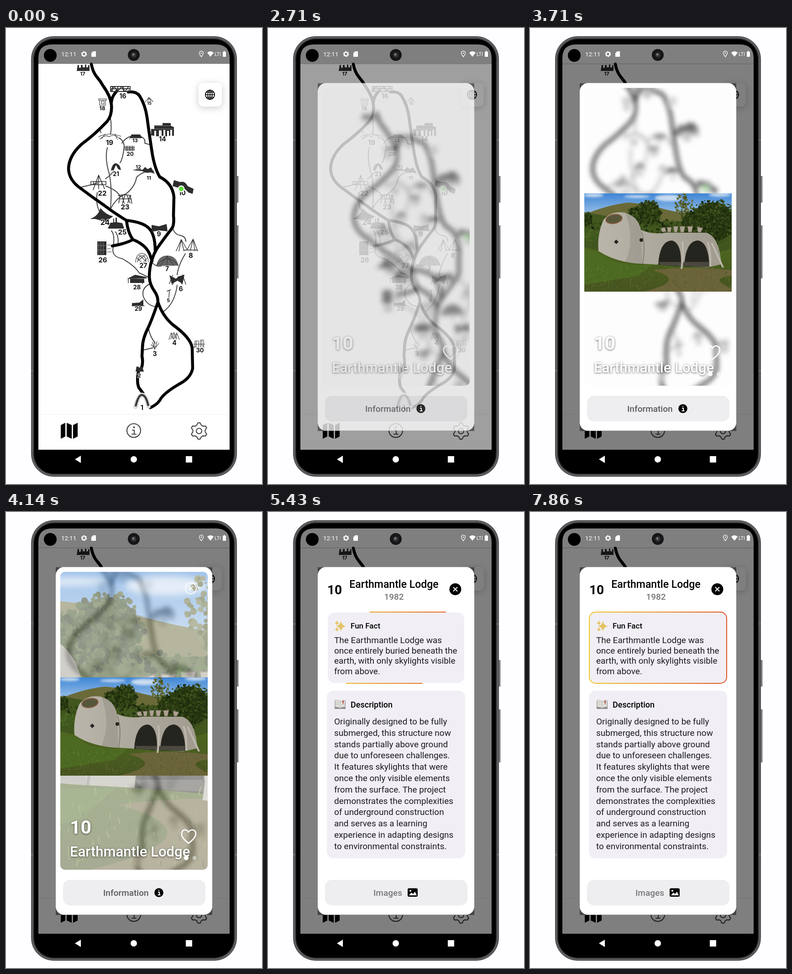
Recreate the animation shown at these times as an HTML page. Size 561 px wide and 998 px high, loop 8000 ms.

```html
<!DOCTYPE html>
<html lang="en">
<head>
<meta charset="utf-8">
<title>Map app</title>
<style>
html, body { margin: 0; width: 100%; height: 100%; overflow: hidden; background: #fefdff; }
svg { display: block; width: 100vw; height: 100vh; font-family: Roboto, sans-serif; }
.medium { font-weight: 500; }
.bold { font-weight: 700; }
.line { fill: none; stroke: #000; stroke-linecap: round; stroke-linejoin: round; }
.soft { filter: drop-shadow(0 2px 4px #0005); }
.glow { filter: drop-shadow(0 1px 2px #0009); }
#labels { font-family: Inter, sans-serif; font-weight: 700; text-anchor: middle; fill: #111; stroke: #fff; stroke-width: 2px; paint-order: stroke; }
</style>
</head>
<body>
<svg viewBox="0 0 561 998">
  <defs>
    <filter id="blur" x="-20%" y="-20%" width="140%" height="140%"><feGaussianBlur stdDeviation="6"/></filter>
    <filter id="haze" x="-20%" y="-50%" width="140%" height="200%"><feGaussianBlur stdDeviation="2.5"/></filter>
    <clipPath id="panel"><rect x="119" y="131" width="323" height="652" rx="10"/></clipPath>
    <clipPath id="thumb"><rect x="143" y="731" width="83" height="83" rx="9"/></clipPath>
    <linearGradient id="sky" x2="0" y2="1"><stop stop-color="#3f86d6"/><stop offset=".6" stop-color="#a9c9ea"/></linearGradient>
    <linearGradient id="meadow" x2="0" y2="1"><stop stop-color="#4c661f"/><stop offset="1" stop-color="#475320"/></linearGradient>
    <linearGradient id="wall" x2="1" y2="0"><stop stop-color="#b9b5aa"/><stop offset="1" stop-color="#a09b8e"/></linearGradient>
    <linearGradient id="fire"><stop stop-color="#efc52c"/><stop offset=".55" stop-color="#ea8a2b"/><stop offset="1" stop-color="#df5128"/></linearGradient>

    <symbol id="photo" viewBox="0 0 323 215" preserveAspectRatio="xMidYMid slice">
      <rect width="323" height="90" fill="url(#sky)"/>
      <g fill="#e8eff6" opacity=".8" filter="url(#haze)"><ellipse cx="20" cy="4" rx="22" ry="4"/><ellipse cx="115" cy="7" rx="28" ry="3"/><ellipse cx="185" cy="10" rx="30" ry="7"/><ellipse cx="297" cy="3" rx="24" ry="4"/></g>
      <path d="M0 46Q55 24 98 20L145 25Q180 38 225 44V120H0z" fill="#6a6a38"/>
      <path d="M0 41Q60 52 130 62L323 60V160H0z" fill="#41561f"/>
      <g id="leaves"/>
      <path d="M0 118Q90 140 180 155L323 122V215H0z" fill="url(#meadow)"/>
      <path d="M150 168Q230 158 323 168V180Q270 186 323 208V215H130Q230 190 150 168z" fill="#6b6339"/>
      <path d="M31 126Q28 88 42 58Q58 38 88 42Q118 50 124 80Q150 91 178 86H268Q290 94 297 130L301 155L270 162L128 154Q70 152 31 126z" fill="url(#wall)"/>
      <path d="M90 43Q118 52 124 80L127 154Q105 152 90 150Q112 100 90 43z" fill="#8f8b7f" opacity=".45"/>
      <path d="M125 84Q135 110 128 154" fill="none" stroke="#858073" stroke-width="2"/>
      <path d="M162 156Q165 104 192 103Q214 108 212 160zM219 160Q222 103 250 103Q273 108 274 161z" fill="#25251f"/>
      <path d="M162 150H274V161L168 157z" fill="#4b483f"/>
      <path d="M213 165Q218 130 215 105M276 160Q278 130 270 106M279 108L304 162" fill="none" stroke="#bdb8ad" stroke-width="4"/>
      <ellipse cx="65" cy="56" rx="18" ry="10" fill="#55563a" stroke="#8d6047" stroke-width="2" transform="rotate(-10 65 56)"/>
      <path d="M70 101l5 5-5 5-5-5z" fill="#222"/><circle cx="125" cy="102" r="4" fill="#282723"/>
      <path d="M167 77l9-3 4 9-9 2zM181 74h10l-2 11h-6zM195 72h11l-3 13h-6zM209 72h12l-3 13h-7zM226 72h12l-3 13h-7zM247 73l13 3-5 9h-6z" fill="#aba18f" stroke="#665c50"/>
      <path d="M0 123Q35 128 58 147Q95 160 150 155L120 180 0 200z" fill="#4d6a22"/>
      <g id="grass" fill="none" stroke-width=".8"/>
    </symbol>

    <g id="map">
      <g class="line" stroke-width="2" style="stroke:#444">
        <path d="M206 224l2 5M229 197Q232 218 229 232M222 262Q216 285 226 318Q233 350 229 393M249 241Q262 251 258 266Q256 285 250 295M254 252Q262 240 274 237M294 237Q307 242 304 252L314 255"/>
        <path d="M166 348Q184 344 198 340M218 330Q230 322 236 313M219 346Q243 355 250 368M230 394Q243 370 263 363Q283 347 286 327Q300 312 323 313M200 360Q196 382 204 400"/>
        <path d="M231 444Q239 452 235 480Q230 500 255 505Q282 520 292 536L311 545M240 446Q248 458 245 473M366 440Q370 452 382 454Q394 456 394 467M393 494Q378 518 375 540M375 563Q370 604 343 622M320 513Q328 523 340 521M315 560Q296 570 301 588Q308 606 327 610M313 660Q316 676 327 690M300 705L322 700"/>
      </g>
      <g class="line" stroke-width="6.5">
        <path d="M187 79Q190 96 199 107Q207 116 213 127Q229 149 231 168Q233 190 222 204Q196 232 166 254Q138 279 137 308Q138 334 165 352Q190 371 215 388Q240 407 264 421Q300 425 313 438Q327 452 327 488M264 421Q267 448 278 463Q306 474 315 495L320 510M278 463Q262 472 233 477"/>
        <path d="M231 162Q232 149 243 138M268 140Q286 138 293 149Q305 168 309 195Q315 240 321 278Q327 310 337 326Q365 340 368 370L367 410Q369 430 364 438Q343 465 330 484Q314 512 314 545Q315 562 326 577Q333 587 333 600Q343 630 365 649Q405 678 408 700L409 745Q405 766 380 779Q344 800 337 815Q330 825 316 831M333 600Q321 635 312 655Q299 680 299 700L298 718Q301 732 297 744M290 753Q286 775 291 787L300 799" />
      </g>
      <g fill="#2d2d2d">
        <path d="M155 94l2-13h3v6h4v-6h4v5h5v-6h3v6h4v-5l3 1v12zM284 752l2-11h4l2 3 3-4 4 2 3 10zM271 241l4-8h19l4 8zM230 312Q233 296 241 296Q250 298 252 311L246 309 241 300 236 311z"/>
        <path d="M318 235v-14h7v-8h18v-5h18v6l7 3v19h-4v-13h-4v13h-3v-11h-4v12h-4v-14h-4v13h-4v-12h-6v13h-6v-12h-4v11z"/>
        <path d="M184 418Q202 412 207 394Q219 409 235 412L218 424 196 418zM223 439l6-13h6v-9h2v8h3v-10h3v10l12 2 4 12zM200 467h20v30h-20zM319 431l16 3 17-5 2 16-18-2-17 3z"/>
        <path d="M358 541l15 8 4-5 14-4-4 20-11-7-13 7zM265 549l18-9 24 5 2 3zM272 549h31v9h-31zM276 602l16-1 9-7v14h-25zM277 311l9-2 8-6 2 7 6 1-4 2zM297 313l8-9 5 5 8-4 8 14-9-3-8 1z"/>
        <path d="M368 333l13 4Q393 334 398 346L411 352 409 363 400 360 393 353 379 350 365 346z"/>
      </g>
      <path d="M329 521Q334 498 353 498Q373 498 378 520z" fill="#666"/>
      <path d="M260 258h22v11h-22z" fill="#aaa"/>
      <path class="line" d="M203 469v27M208 469v27M213 469v27M200 476h20M200 486h20M322 221h44M326 214h34" stroke-width=".8" style="stroke:#999"/>
      <g class="line" stroke-width="1.1" style="stroke:#333">
        <path stroke-width="1.800" d="M229 128h43v11h-43zM229 133h43M229 139l8-11 8 11 8-11 8 11 8-11M233 128v11M245 128v11M257 128v11"/>
        <path d="M203 155h17v3h-17zM205 158v11h13v-11M209 160h6v6h-6zM305 162l8-10 9 9M313 152l-3 11M313 152l5 10M203 238Q225 227 252 237M206 243Q218 232 226 238Q237 230 250 243M217 232l-7 10M239 232l5 12M272 241l-1 2M260 262h22M260 266h22M265 258v11M271 258v11M277 258v11"/>
        <path stroke-width="1.600" d="M186 336h33v7h-33zM192 336v7M200 336v7M210 336v7M191 354L203 322 216 352M203 322v30M246 367Q260 363 274 367M250 366l-3 17M254 366l5 18M261 365l-6 19M265 366l7 17M272 366l-5 17M272 366l4 18M250 374h25"/>
        <path d="M222 475h8M222 483h7M222 490h9M284 513Q285 494 298 493Q311 495 312 512M288 513Q290 498 298 498Q306 498 307 512M287 503l9 9M292 497l14 13M304 497l-14 12M310 503l-9 10M329 521Q353 490 378 520M339 519l14-20 14 20M353 499v20"/>
        <path stroke-width="1.400" d="M373 488L384 463 397 485 410 462 420 488M384 463l-5 25M384 463l6 25M410 462l-6 25M410 462l4 26M390 486h29M358 560l7-19M394 561l-7-21M364 562l10-14M386 561l-8-14M268 549v9M284 549v9M299 549v11M358 574l-1 16M353 576l8-3M276 608h27"/>
        <path d="M357 682l5-15 4 14 2-15 5 15 1-14 6 15M361 681l4-13M368 681l4-11M318 693l9 8 4-15M321 688l5 16M335 690l-10 13M325 685v16M414 700v-15h8v15M426 699v-16h7v15M411 692h25M417 686v13M429 684v13M411 699l4-3M434 699l-3-4"/>
      </g>
      <path class="line" d="M284 829Q290 803 298 803Q307 804 312 828" stroke-width="10" style="stroke:#ddd"/>
      <path class="line" d="M284 828Q290 803 298 803Q307 804 312 827" stroke-width="4.500" style="stroke:#3a3a3a;stroke-linecap:butt"/>
      <g id="labels"></g>
      <circle cx="384" cy="352" r="6.300" fill="#5fe03b" stroke="#fff" stroke-width="2.200"/>
    </g>
  </defs>

  <!-- Phone body -->
  <path d="M506 324h3.500v58h-3.500zM506 432h3.500v116h-3.500z" fill="#7c7c80"/>
  <rect x="55.500" y="18.500" width="450" height="963" rx="49" fill="#5d5d60" stroke="#3b3b3d"/>
  <rect x="60" y="23" width="441" height="954" rx="45" fill="#222"/>
  <rect x="62" y="25" width="437" height="950" rx="43"/>
  <path d="M55 245h5M55 750h5M501 245h5M501 750h5" stroke="#999"/>
  <path d="M71 79V66Q71 36 101 36H460Q490 36 490 66V79z" fill="#807f80"/>
  <path d="M71 78.500H490V923H71z" fill="#fff"/>
  <circle cx="97" cy="60" r="14"/>
  <circle cx="280" cy="59" r="13" fill="#161616"/><circle cx="280" cy="59" r="6" fill="#303236"/><circle cx="279" cy="58" r="2.500" fill="#77797c"/>
  <g fill="#fff">
    <text x="121" y="62" font-size="13.400">12:11</text>
    <circle cx="171" cy="57" r="4" fill="none" stroke="#fff" stroke-width="2.600"/>
    <circle cx="171" cy="57" r="5.600" fill="none" stroke="#fff" stroke-width="1.500" stroke-dasharray="2.900 2.960"/>
    <path d="M187 55l4-4h6v12h-10zM441 54Q448 48 455 54L448 63zM475 52h2v-1.500h3V52h2v11h-7z"/>
    <path d="M428 63Q423.500 57 423.500 55a4.300 4.300 0 0 1 9 0Q432.500 57 428 63z" fill="none" stroke="#fff" stroke-width="1.300"/><circle cx="428" cy="55" r="1.300"/>
    <text x="457" y="61" font-size="11">LTI</text>
    <path d="M151 944l13-8v16z"/><circle cx="280" cy="944" r="7"/><path d="M394 937h14v14h-14z"/>
  </g>

  <!-- App -->
  <use href="#map"/>
  <rect x="422" y="120" width="51" height="52" rx="10" fill="#fff" style="filter:drop-shadow(0 3px 8px #0003)"/>
  <g class="line" stroke-width="1.700"><circle cx="447" cy="146" r="10"/><ellipse cx="447" cy="146" rx="4.800" ry="10"/><path d="M437 146h20M447 136v20M439 140.500h16M439 151.500h16"/></g>
  <path d="M71 845.500H490" stroke="#eee"/>
  <path d="M120 869l10-5v30l-10 5zM133 864l11 5v30l-11-5zM147 869l10-5v30l-10 5z"/>
  <g class="line" stroke-width="2.200" style="stroke:#4a4a4a"><circle cx="280" cy="881" r="15"/><path d="M277 880h4v9M276 889h9"/><circle cx="280.500" cy="874" r="1"/><circle cx="423" cy="882" r="6"/><path id="gear"/></g>

  <g id="banner">
    <rect x="82" y="721" width="396" height="104" rx="10" fill="#fbfafc" class="soft"/>
    <path class="line" d="M106 766l13 13M119 766l-13 13M454 767l6 6-6 6" stroke-width="2.200"/>
    <g clip-path="url(#thumb)"><use href="#photo" x="143" y="731" width="83" height="83"/></g>
    <text x="236" y="748" font-size="14.500" fill="#444">Just Visited!</text>
    <g class="bold" font-size="24.500"><text x="236" y="778.500">Earthmantle</text><text x="236" y="807.500">Lodge</text></g>
    <text x="394" y="784" class="bold" font-size="28" fill="#555">10</text>
  </g>

  <rect id="dim" x="71" y="78" width="419" height="845" opacity=".5"/>
  <g id="modal">
    <path d="M109 121H452V882H109z" fill="#444"/>
    <rect x="109" y="120.500" width="343" height="761" rx="18" fill="#fff"/>
    <rect x="125" y="805" width="312" height="56" rx="15" fill="#eeedef"/>
    <g id="gallery">
      <g clip-path="url(#panel)">
        <rect x="119" y="131" width="323" height="652" fill="#fdfdfd"/>
        <g id="backdrop" opacity=".82"><use href="#map" filter="url(#blur)"/></g>
        <use id="cover" href="#photo" x="119" y="131" width="323" height="652" opacity=".58"/>
      </g>
      <use id="picture" href="#photo" x="119" y="362" width="323" height="215"/>
      <g fill="#fff">
        <g class="medium glow"><text x="140" y="704" font-size="41" class="bold">10</text><text x="140" y="754" font-size="31">Earthmantle Lodge</text></g>
        <path class="line" d="M400 725Q384 713 385 704C386 693 397 694 400 701C404 693 416 694 416 705Q415 714 400 725z" stroke-width="2.600" style="stroke:#fff"/>
        <g class="line" stroke-width="1.800" style="stroke:#fff"><circle cx="405" cy="167" r="12"/><path d="M401 163l8 8M409 163l-8 8"/></g>
        <g id="dots"><circle cx="395" cy="757" r="5"/><circle cx="413" cy="757" r="4" opacity=".45"/></g>
      </g>
      <text x="213" y="840" class="medium" font-size="19" fill="#5a5a5c">Information</text>
      <circle cx="335" cy="833" r="9.800"/><path d="M333 832h3v6M332.500 838h6M334 828h2" fill="none" stroke="#fff" stroke-width="2"/>
    </g>
    <g id="info">
      <rect x="119" y="131" width="323" height="652" fill="#fff"/>
      <text x="130" y="180" class="bold" font-size="28">10</text>
      <g text-anchor="middle"><text x="276" y="166" class="medium" font-size="23">Earthmantle Lodge</text><text x="276" y="192" font-size="19" class="medium" fill="#77777a">1982</text></g>
      <circle cx="410.500" cy="169" r="13"/><path class="line" d="M406.500 165l8 8M414.500 165l-8 8" stroke-width="2" style="stroke:#fff"/>
      <rect x="131" y="220" width="299" height="154" rx="14" fill="#f1eff5"/>
      <rect x="129" y="391" width="303" height="367" rx="14" fill="#f1eff5"/>
      <rect id="border" x="130" y="219" width="301" height="156" rx="14" pathLength="2" fill="none" stroke="url(#fire)" stroke-width="2"/>
      <path d="M160 238q1 10 11 12-10 2-11 12-2-10-11-12 9-2 11-12zM151 237q1 5 5 6-4 1-5 6-1-5-5-6 4-1 5-6zM151 252q1 4 5 5-4 1-5 5-1-4-5-5 4-1 5-5z" fill="#e5c367"/>
      <path d="M146 414h24v17h-24z" fill="#8d8988"/><path d="M147 412q7-1 11 3 5-4 11-3v15q-7-1-11 3-4-4-11-3z" fill="#e4e1dd" stroke="#aaa5a2"/><path d="M158 415v14M149 417h6M149 421h6M161 421h6" stroke="#aaa"/><path d="M163 413h3v7l-1.500-2-1.500 2z" fill="#b85b4f"/>
      <g class="medium"><text x="181" y="255" font-size="17">Fun Fact</text><text x="181" y="428" font-size="18">Description</text></g>
      <g id="copy" font-size="19" fill="#1c1b1e"></g>
      <text x="231" y="840" class="medium" font-size="19" fill="#79797c">Images</text>
      <rect x="306" y="823.500" width="22" height="18.500" rx="3"/><path d="M309 839l5-6 4 3 4-5 4 8z" fill="#fff"/><circle cx="312" cy="829" r="2" fill="#fff"/>
    </g>
  </g>
</svg>
<script>
const LOOP = 8000;
const $ = id => document.getElementById(id);
const repeat = (count, fn) => Array.from({ length: count }, (_, i) => fn(i)).join('');

// Map labels 1 to 30: centre x, baseline, font size
const labels = [
  [298, 836, 14], [292, 765, 12], [326, 718, 14], [369, 694, 14], [356, 600, 11],
  [383, 576, 14], [353, 532, 14], [405, 503, 15], [335, 456, 14], [386, 366, 14],
  [313, 332, 11], [290, 308, 11], [283, 250, 11], [343, 248, 14], [314, 168, 9],
  [256, 154, 14], [168, 104, 11], [211, 180, 12], [227, 256, 15], [272, 280, 12],
  [241, 324, 13], [211, 367, 15], [261, 397, 15], [217, 431, 16], [255, 452, 15],
  [212, 513, 15], [301, 525, 14], [287, 572, 13], [290, 619, 13], [425, 710, 13]
];
$('labels').innerHTML = labels.map(([x, y, size], i) =>
  `<text x="${x}" y="${y}" font-size="${size}">${i + 1}</text>`).join('');

const paragraph = (top, leading, text) => text.split('|').map((line, i) =>
  `<text x="145" y="${top + i * leading}">${line}</text>`).join('');
$('copy').innerHTML =
  paragraph(287, 22.5, 'The Earthmantle Lodge was|once entirely buried beneath the|earth, with only skylights visible|from above.') +
  paragraph(465, 24.8, 'Originally designed to be fully|submerged, this structure now|stands partially above ground|due to unforeseen challenges.|It features skylights that were|once the only visible elements|from the surface. The project|demonstrates the complexities|of underground construction|and serves as a learning|experience in adapting designs|to environmental constraints.');

// Six teeth, four corners each
$('gear').setAttribute('d', 'M' + Array.from({ length: 24 }, (_, i) => {
  const angle = (i - 1.5) * Math.PI / 12 - Math.PI / 2;
  const r = i % 4 === 1 || i % 4 === 2 ? 18 : 13.5;
  return `${423 + r * Math.cos(angle)} ${882 + r * Math.sin(angle)}`;
}).join('L') + 'z');

let seed = 7;
const random = () => (seed = seed * 16807 % 2147483647) / 2147483647;
const pick = list => list[Math.floor(random() * list.length)];

// Foliage cloud inside an ellipse
const tree = (cx, cy, rx, ry, count, colors) => repeat(count, () => {
  const angle = random() * Math.PI * 2, d = Math.sqrt(random());
  return `<circle cx="${cx + rx * d * Math.cos(angle)}" cy="${cy + ry * d * Math.sin(angle)}" r="${.7 + random() * 2.3}" fill="${pick(colors)}"/>`;
});
const crown = (cx, cy, rx, ry, count) =>
  `<ellipse cx="${cx}" cy="${cy}" rx="${rx * .85}" ry="${ry * .85}" fill="#26350f"/>` + tree(cx, cy, rx, ry, count, dark);
const dark = ['#24350f', '#2d4115', '#42551f', '#1b280c', '#364a19'];
const pale = ['#5b6230', '#44501f', '#6c7140'];
$('leaves').innerHTML =
  tree(160, 72, 160, 14, 300, dark) +
  crown(142, 42, 27, 28, 260) + crown(112, 50, 18, 22, 120) +
  tree(218, 26, 20, 26, 110, pale) +
  crown(282, 62, 56, 50, 600) + crown(235, 66, 24, 28, 180) +
  crown(8, 58, 11, 18, 60) + tree(15, 92, 24, 14, 90, ['#3e5a1c', '#4a6623']);
$('grass').innerHTML = repeat(260, () => {
  const x = random() * 323, y = 160 + random() * 54;
  return `<path d="M${x} ${y}l${random() * 4 - 2} -${2 + random() * 4}" stroke="${pick(['#637c2e', '#3c511a', '#74813f'])}"/>`;
});

// Steps are [time in ms, style]; the first and last style hold outwards
function play(id, steps) {
  const frames = steps.map(([time, style]) => ({ offset: time / LOOP, ...style }));
  frames.unshift({ ...frames[0], offset: 0 });
  frames.push({ ...frames[frames.length - 1], offset: 1 });
  $(id).animate(frames, { duration: LOOP, iterations: Infinity });
}
const fade = (from, to, start, end = start) => [[start, { opacity: from }], [end, { opacity: to }]];

play('banner', [
  [1290, { opacity: 0, transform: 'translateY(58px)', easing: 'ease-out' }],
  [1640, { opacity: 1, transform: 'none' }],
  [2500, { opacity: 1, transform: 'none' }],
  [2640, { opacity: 0, transform: 'none' }]
]);
play('dim', fade(0, .5, 2500, 2780));
play('modal', fade(0, 1, 2500, 2780));
play('backdrop', [
  [3430, { transform: 'translate(51px, 107px)' }],
  [3430, { transform: 'translate(0px, 0px)' }]
]);
play('picture', fade(0, 1, 3570));
play('dots', fade(0, 1, 3570));
play('cover', fade(0, .58, 3850, 4200));
play('gallery', fade(1, 0, 5140));
play('info', fade(0, 1, 5140));
play('border', [
  [5140, { strokeDasharray: '0 1', strokeDashoffset: 0, opacity: 0 }],
  [5140, { strokeDasharray: '0 1', strokeDashoffset: 0, opacity: 1 }],
  [5913, { strokeDasharray: '1 0', strokeDashoffset: -.47, opacity: 1 }]
]);
</script>
</body>
</html>
```
